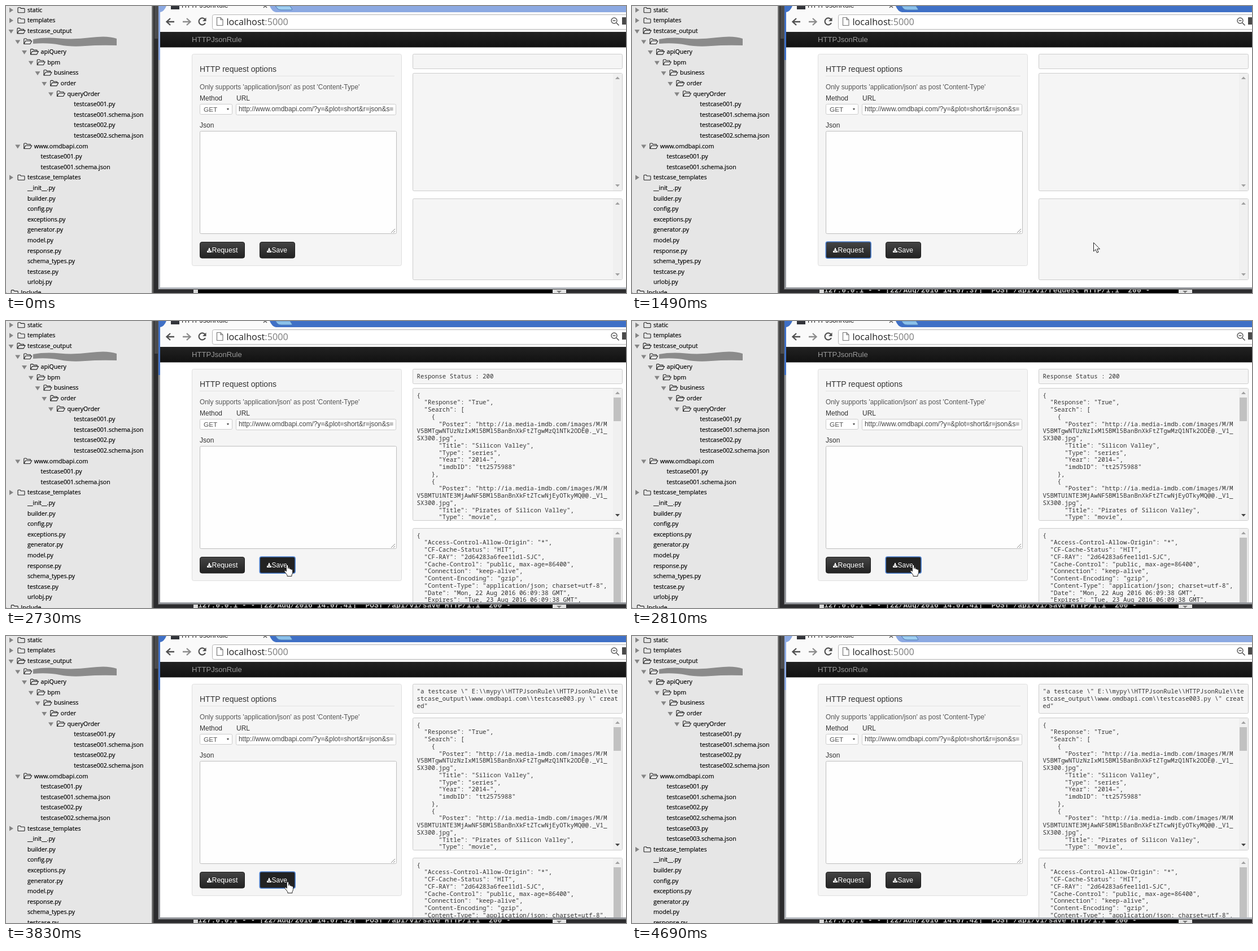
Animation, 1098 px wide and 510 px high, one loop 4.77 s. Source, as an HTML page:

```html
<!DOCTYPE html>
<html lang="en">
<head>
<meta charset="utf-8">
<title>HTTPJsonRule</title>
<style>
html, body { margin: 0; width: 100%; height: 100%; overflow: hidden; background: #fff; }
svg { display: block; width: 100%; height: 100%; }
text { white-space: pre; }
.ui { font-family: "Liberation Sans", Arial, sans-serif; }
.tree { font: 10.6px "Open Sans", "Noto Sans", sans-serif; fill: #000; stroke: #000; stroke-width: .2px; }
.mono { font: 10.8px "Noto Sans Mono", "DejaVu Sans Mono", monospace; fill: #333; }
.term { font: bold 13px "Liberation Mono", monospace; fill: #d0d0d0; }
</style>
</head>
<body>
<svg id="stage" viewBox="0 0 1098 510" preserveAspectRatio="none">
  <defs>
    <linearGradient id="nav" x2="0" y2="1"><stop stop-color="#222"/><stop offset="1" stop-color="#111"/></linearGradient>
    <linearGradient id="btn" x2="0" y2="1"><stop stop-color="#444"/><stop offset="1" stop-color="#222"/></linearGradient>
    <linearGradient id="edge"><stop stop-color="#8a8a8a"/><stop offset="1" stop-color="#222"/></linearGradient>
    <clipPath id="page"><path d="M273 73H1098V500H273Z"/></clipPath>
    <clipPath id="field"><path d="M409 175H688V192H409Z"/></clipPath>
  </defs>
</svg>
<script>
const NS = 'http://www.w3.org/2000/svg';
const LOOP = 4770, STEP = 80, LINE = 12.76, ROW = 18.6;
const stage = document.getElementById('stage');

function add(parent, tag, attrs, content) {
  const el = document.createElementNS(NS, tag);
  for (const k in attrs) el.setAttribute(k, attrs[k]);
  if (content !== undefined) el.textContent = content;
  parent.append(el);
  return el;
}
const group = (parent, attrs = {}) => add(parent, 'g', attrs);
const rect = (p, x, y, width, height, fill, more) => add(p, 'rect', { x, y, width, height, fill, ...more });
const path = (p, d, more) => add(p, 'path', { d, ...more });
const label = (p, x, y, str, size, fill, more) =>
  add(p, 'text', { x, y, class: 'ui', 'font-size': size, fill, ...more }, str);
const box = (p, x, y, w, h, fill, stroke, rx = 2) => rect(p, x + .5, y + .5, w, h, fill, { stroke, rx });
const show = (el, on) => el.setAttribute('display', on ? 'inline' : 'none');
const line = (stroke, width) => ({ fill: 'none', stroke, 'stroke-width': width });

// Project tree: "depth kind name", kind is + closed, - open, . file
function buildTree(extra) {
  const g = group(stage);
  const pair = n => [`.testcase00${n}.py`, `.testcase00${n}.schema.json`];
  const at = (depth, names) => names.map(n => [depth, n]);
  const rows = [
    ...at(0, ['+static', '+templates', '-testcase_output']),
    [1, '-'], [2, '-apiQuery'], [3, '-bpm'], [4, '-business'], [5, '-order'], [6, '-queryOrder'],
    ...at(7, [...pair(1), ...pair(2)]),
    [1, '-www.omdbapi.com'],
    ...at(2, [1, 2, 3].slice(0, extra + 1).flatMap(pair)),
    [0, '+testcase_templates'],
    ...at(0, ['__init__', 'builder', 'config', 'exceptions', 'generator', 'model', 'response',
      'schema_types', 'testcase', 'urlobj'].map(n => `.${n}.py`)),
    [-1, '+Include']
  ];
  rows.forEach(([depth, item], i) => {
    const x = 38 + 11.75 * depth, y = 7.2 + ROW * i;
    if (y > 515) return;
    const kind = item[0];
    if (kind !== '.') folder(g, x, y, kind === '-');
    add(g, 'text', { x, y: Math.round(y + 3.6), class: 'tree' }, item.slice(1));
  });
  return g;
}
function folder(g, x, y, open) {
  path(g, open ? `M${x - 33.5} ${y - 2.5}h9l-4.5 7z` : `M${x - 32} ${y - 4.5}v9l7-4.5z`, { fill: '#858585' });
  const o = { ...line('#222', 1.1), 'stroke-linejoin': 'round' };
  path(g, open
    ? `M${x - 18} ${y + 4.5}v-8.5q0-1 1-1h3l1.5 1.8h6v2.2M${x - 18} ${y + 4.5}l3-5.5h11l-3 5.5z`
    : `M${x - 17} ${y - 3.5}q0-1 1-1h3.2l1.3 1.7h5.5q1 0 1 1v5.3q0 1-1 1h-10q-1 0-1-1z`, o);
}

rect(stage, 0, 0, 259, 510, '#e6e6e6');
const trees = [0, 1, 2].map(buildTree);
path(stage, 'M48 59Q70 55 95 57.5T150 56T196 58V70Q165 69 140 71T95 69T48 67Z', { fill: '#8b8b8b' });

// Desktop strips and the terminal behind the browser
rect(stage, 258, 0, 840, 510, '#2c2c2e');
rect(stage, 258, 0, 5, 510, 'url(#edge)');
rect(stage, 263, 0, 7, 58, '#4b4b4d');
rect(stage, 332, 500, 8, 10, '#d8d8d8');
rect(stage, 340, 500, 628, 10, '#000');
rect(stage, 968, 500, 24, 10, '#e4e4e4');
path(stage, 'M975 506h9l-4.5 4z', { fill: '#777' });
const term = add(stage, 'text', { x: 340, y: 508.5, class: 'term' }, '');

// Browser frame
const border = rect(stage, 269.5, -5, 840, 508.5, '#b4b8be', { stroke: '#555' });
const frame = group(stage);
rect(frame, 270, 0, 828, 12, 'currentColor');
rect(frame, 270, 0, 3, 96, 'currentColor');
path(frame, 'M477 0H503L507 6Q507 7 505 7H487Q483 7 481 5Z', { fill: '#a5dcf5', stroke: '#4a78b4', 'fill-opacity': .75 });
path(stage, 'M273 46V11Q280 10 284 0H467Q471 10 478 11H1098V46Z', { fill: '#fafafa' });
rect(stage, 292, 0, 15, 6, '#32343a');
label(stage, 311, 3, 'HTTPJsonRule', 12.2, '#222');
path(stage, 'M456 -3l6 6m0-6l-6 6', line('#555', 1.4));
path(stage, 'M298 28H285m6-6l-6.5 6l6.5 6', line('#505050', 2.3));
path(stage, 'M313 28H326m-6-6l6.5 6l-6.5 6', line('#8c8c8c', 2.3));
path(stage, 'M352.5 24A6 6 0 1 0 353 30', line('#505050', 2.2));
path(stage, 'M354.5 20.5v6.5h-6.5z', { fill: '#505050' });
box(stage, 365, 15, 760, 26, '#fff', '#b5b5b5', 3);
path(stage, 'M373.5 20.5h6.5l4 4v10h-10.5zM380 20.5v4h4', line('#777', 1.2));
const address = add(stage, 'text', { x: 390.5, y: 33.5, fill: '#222', style: 'font:16.2px "Open Sans",sans-serif' });
add(address, 'tspan', {}, 'localhost');
add(address, 'tspan', { fill: '#7a7a7a' }, ':5000');
add(stage, 'circle', { cx: 1077, cy: 26, r: 5, ...line('#555', 1.4) });
path(stage, 'M1074.5 26h5M1081 30l4.5 4.5', line('#555', 1.6));
rect(stage, 1091, 20, 9, 13, '#4a4a4a');

// Page
rect(stage, 273, 73, 825, 427, '#fff');
rect(stage, 273, 46, 825, 27.5, 'url(#nav)');
label(stage, 329, 64, 'HTTPJsonRule', 13.1, '#999');
box(stage, 329, 85, 371, 376, '#f5f5f5', '#dfdfdf', 3);
label(stage, 343, 117, 'HTTP request options', 14, '#333');
path(stage, 'M343 124.5H688', line('#e2e2e2', 1));
label(stage, 343, 148, "Only supports 'application/json' as post 'Content-Type'", 11.87, '#555');
label(stage, 343, 168, 'Method', 12, '#333');
label(stage, 408, 168, 'URL', 12, '#333');
box(stage, 343, 174, 57, 18, '#fff', '#ccc');
label(stage, 350, 188, 'GET', 11.8, '#555');
path(stage, 'M391 182h4l-2 3z', { fill: '#333' });
box(stage, 407, 174, 283, 19, '#fff', '#ccc');
label(stage, 412, 187, 'http://www.omdbapi.com/?y=&plot=short&r=json&s=', 11.9, '#444', { 'clip-path': 'url(#field)' });
label(stage, 343, 216, 'Json', 12, '#333');
box(stage, 343, 222, 348, 182, '#fefefe', '#bdbdbd');
path(stage, 'M682 403l7-7M686 403l3-3', line('#888', 1));

function makeButton(x, w, caption, size) {
  const g = group(stage);
  const face = rect(g, x + .5, 419.5, w - 1, 28.5, 'url(#btn)', { rx: 3.5, stroke: '#1d1d1d' });
  const ring = rect(g, x + .3, 419, w - .2, 29.3, 'none', { rx: 3, stroke: '#4a7fd0', 'stroke-width': 1.6 });
  path(g, `M${x + 16} 430h2v3h2l-3 3.2l-3-3.2h2zM${x + 13} 435h1.8l2.2 2l2.2-2h1.8v3h-8z`, { fill: '#fff' });
  label(g, x + 21.5, 437.5, caption, size, '#fff');
  return (hover, focus) => {
    face.setAttribute('fill', hover ? '#222' : 'url(#btn)');
    show(ring, focus);
  };
}
const setRequest = makeButton(343, 80, 'Request', 12.3);
const setSave = makeButton(449, 63, 'Save', 12);

// Result panels
const movie = (tail, title, type) => [
  '    {', '      "Poster": "http://ia.media-imdb.com/images/M/M', tail, 'SX300.jpg",',
  `      "Title": "${title}",`, `      "Type": "${type}",`
];
const BODY = [
  '{', '  "Response": "True",', '  "Search": [',
  ...movie('V5BMTgwNTUzNzIxM15BMl5BanBnXkFtZTgwMzQ1NTk2ODE@._V1_', 'Silicon Valley', 'series'),
  '      "Year": "2014–",', '      "imdbID": "tt2575988"', '    },',
  ...movie('V5BMTU1NTE3MjAwNF5BMl5BanBnXkFtZTcwNjEyOTkyMQ@@._V1_', 'Pirates of Silicon Valley', 'movie')
];
const HEADERS = [
  '{', '  "Access-Control-Allow-Origin": "*",', '  "CF-Cache-Status": "HIT",',
  '  "CF-RAY": "2d64283a6fee11d1-SJC",', '  "Cache-Control": "public, max-age=86400",',
  '  "Connection": "keep-alive",', '  "Content-Encoding": "gzip",',
  '  "Content-Type": "application/json; charset=utf-8",',
  '  "Date": "Mon, 22 Aug 2016 06:09:38 GMT",', '  "Expires": "Tue, 23 Aug 2016 06:09:38 GMT",'
];
const created = n => [
  '"a testcase \\" E:\\\\mypy\\\\HTTPJsonRule\\\\HTTPJsonRule\\\\te',
  `stcase_output\\\\www.omdbapi.com\\\\testcase00${n}.py \\" creat`, 'ed"'
];

function scrollBox(g, y, h, lines, thumb) {
  box(g, 720, y, 371, h, '#f5f5f5', '#ccc');
  rect(g, 1075, y + 1, 16, h - 1, '#f0f0f0');
  if (thumb) rect(g, 1076, y + 17, 13, thumb, '#c1c1c1');
  path(g, `M1079 ${y + 11}h8l-4-4.5z`, { fill: '#a0a0a0' });
  path(g, `M1079 ${y + h - 11}h8l-4 4.5z`, { fill: lines.length ? '#444' : '#a0a0a0' });
  write(g, lines, y + 16.5);
}
function write(g, lines, y) {
  lines.forEach((s, i) => add(g, 'text', { x: 727.5, y: Math.round(y + i * LINE), class: 'mono' }, s));
}
function buildPanels(message) {
  const g = group(stage, { 'clip-path': 'url(#page)' });
  const dy = message.length > 1 ? 26 : 0, full = message.length > 0;
  box(g, 720, 85, 371, 26 + dy, '#f5f5f5', '#ccc');
  write(g, message, 102);
  scrollBox(g, 119 + dy, full ? 235 : 209, full ? BODY : [], full && 42);
  scrollBox(g, (full ? 368 : 342) + dy, full ? 235 : 144, full ? HEADERS : [], full && 200);
  return g;
}
const panels = [[], ['Response Status : 200'], created(2), created(3)].map(buildPanels);

// Pointer
const arrow = path(stage, 'M.5 .5V16L4 12.7L6.4 18.4L9 17.3L6.6 11.8H11.5Z', { fill: '#fff', stroke: '#222' });
const hand = path(stage, 'M-1.6 12V1.8Q-1.4.4 0 .4T1.6 1.8V7Q3-.0 4.4 7.6Q5.8 6.6 7 8.4Q9.6 7.6 9.6 10V14Q9.6 16 8 18V20.5H0V18.5L-4.8 12.2Q-5.6 10.4-4 10Q-3 10-1.6 12Z',
  { fill: '#fff', stroke: '#222' });

const MOVES = [
  { at: 130, steps: 7, from: [571, 488], to: [388, 438], ease: u => 1 - (1 - u) ** 2.2, delay: 1 },
  { at: 690, steps: 1, from: [388, 438], to: [388, 439] },
  { at: 930, steps: 6, from: [388, 439], to: [817, 420], ease: u => u * u * (3 - 2 * u) },
  { at: 2030, steps: 6, from: [817, 420], to: [498, 433], ease: u => 1 - (1 - u) ** 2.75, easeY: u => u * u },
  { at: 3830, steps: 5, from: [498, 433], to: [520, 515], ease: u => u * u }
];
function pointer(t) {
  const m = MOVES.filter(v => t >= v.at).pop();
  if (!m) return [-50, -50];
  const skip = m.delay || 0;
  const step = Math.min(m.steps, Math.floor((t - m.at) / STEP) + 1);
  const u = (step - skip) / (m.steps - skip);
  const ease = m.ease || (v => v), easeY = m.easeY || ease;
  return [
    m.from[0] + (m.to[0] - m.from[0]) * ease(u),
    m.from[1] + (m.to[1] - m.from[1]) * easeY(u)
  ];
}

// Index of the last cue already passed
const phase = (t, ...cues) => cues.filter(c => t >= c).length;
const over = ([x, y], left, right) => x >= left && x <= right && y >= 419 && y <= 448;
const LOG = [['37', 'request'], ['41', 'save'], ['42', 'save']]
  .map(([s, api]) => `127.0.0.1 - - [22/Aug/2016 14:07:${s}] "POST /api/v1/${api} HTTP/1.1" 200 -`);

function draw(t) {
  const pos = pointer(t);
  const onRequest = over(pos, 343, 423), onSave = over(pos, 449, 512);
  const place = `translate(${pos[0].toFixed(1)} ${pos[1].toFixed(1)})`;
  for (const c of [arrow, hand]) c.setAttribute('transform', place);
  show(hand, onRequest || onSave);
  show(arrow, !(onRequest || onSave));

  const active = t >= 850 && t < 4690;
  frame.setAttribute('color', active ? '#3f70c6' : '#8ca9e2');
  border.setAttribute('fill', active ? '#94979c' : '#b4b8be');
  setRequest(onRequest, t >= 930 && t < 2650);
  setSave(onSave, t >= 2650 && t < 4690);

  const result = phase(t, 1570, 2890, 3750), files = phase(t, 3050, 3910);
  panels.forEach((p, i) => show(p, i === result));
  trees.forEach((g, i) => show(g, i === files));
  term.textContent = ['', ...LOG][phase(t, 1490, 2730, 3670)];
}

let start;
function tick(now) {
  start ??= now;
  draw((now - start) % LOOP);
  requestAnimationFrame(tick);
}
draw(0);
requestAnimationFrame(tick);
</script>
</body>
</html>
```
